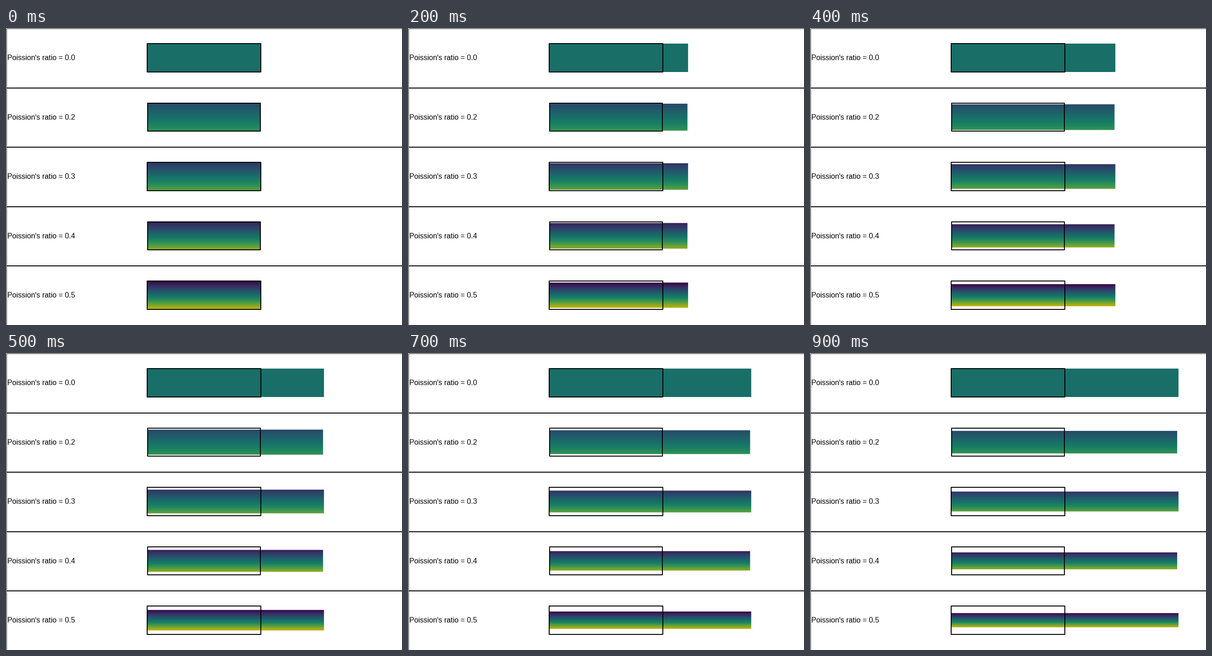
Write a matplotlib script that moves like this. It is 864 px wide and 648 px high and loops after 1000 ms.

```python
import math

import numpy as np
import matplotlib.pyplot as plt
from matplotlib.animation import FuncAnimation
from matplotlib.patches import Rectangle

WIDTH, HEIGHT, DPI = 864, 648, 72  # at 72 dpi one point is one pixel
FRAMES, INTERVAL = 10, 100
RATIOS = (0.0, 0.2, 0.3, 0.4, 0.5)
ROW_EDGES = (0, 130, 259, 389, 518, 648)
LIGHT = np.array([0.79, 0.765, 0.745])  # slightly warm scene lighting
VIRIDIS = plt.get_cmap("viridis")


def bar_box(row):
    """Left, centre y, width and height of the unstretched bar."""
    top, bottom = ROW_EDGES[row:row + 2]
    scale = (bottom - top) / 130
    width = 248 * scale
    return WIDTH / 2 - width / 2, (top + bottom) / 2, width, 62 * scale


def coverage(size, start, end):
    """Share of each pixel that lies between start and end."""
    pixel = np.arange(size)
    return np.clip(np.minimum(pixel + 1, end) - np.maximum(pixel, start), 0, 1)


def render(strain):
    canvas = np.ones((HEIGHT, WIDTH, 3))
    for row, ratio in enumerate(RATIOS):
        left, middle, width, height = bar_box(row)
        width *= 1 + strain
        height *= 1 - ratio * strain
        top = middle - height / 2
        depth = np.clip((np.arange(HEIGHT) + 0.5 - top) / height, 0, 1)
        color = VIRIDIS(0.5 + ratio * (2 * depth - 1))[:, None, :3] * LIGHT
        alpha = np.outer(coverage(HEIGHT, top, top + height),
                         coverage(WIDTH, left, left + width))[..., None]
        canvas += alpha * (color - canvas)
    return canvas


def outline(x, y, width, height, line):
    ax.add_patch(Rectangle((x, y), width, height, fill=False, edgecolor="black",
                           linewidth=line, joinstyle="round", snap=True))


fig = plt.figure(figsize=(WIDTH / DPI, HEIGHT / DPI), dpi=DPI, facecolor="white")
bars = fig.figimage(render(0), origin="upper", zorder=-1)
ax = fig.add_axes([0, 0, 1, 1], zorder=1)
ax.set(xlim=(0, WIDTH), ylim=(HEIGHT, 0))
ax.axis("off")

for row, ratio in enumerate(RATIOS):
    top, bottom = ROW_EDGES[row:row + 2]
    outline(0.5, top + 0.5, WIDTH - 1, bottom - top - 1, 1)
    left, middle, width, height = bar_box(row)
    outline(left, middle - height / 2, width, height, 2)
    ax.text(3, math.ceil(middle + 5), f"Poission's ratio = {ratio:.1f}",
            family="Liberation Sans", size=16, color="black", va="baseline")


def update(frame):
    bars.set_data(render(frame / (FRAMES - 1)))
    return [bars]


animation = FuncAnimation(fig, update, frames=FRAMES, interval=INTERVAL,
                          repeat=True, blit=False)
plt.show()
```
